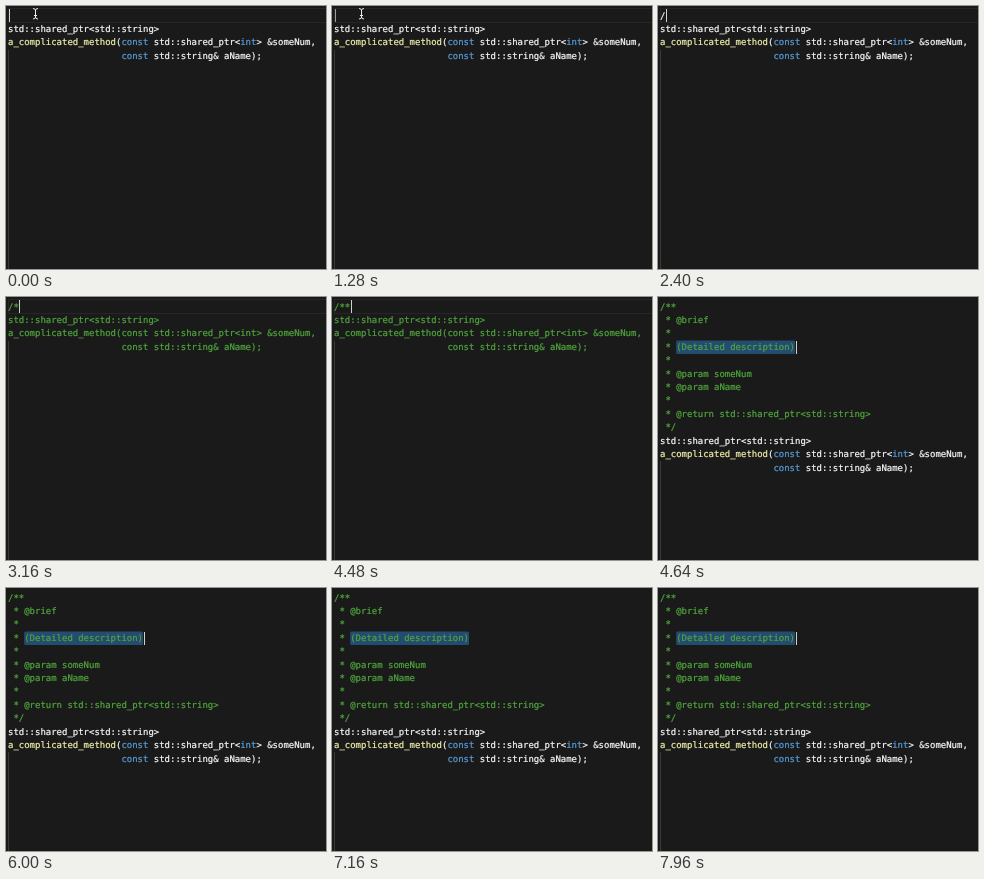
Animation of 320x263 px, one loop 8000 ms. Source, as an HTML page:

```html
<!DOCTYPE html>
<html lang="en">
<head>
<meta charset="utf-8">
<title>Comment block expansion</title>
<style>
  html, body { margin: 0; width: 100%; height: 100%; overflow: hidden; background: #1a1a1a; }
  svg { display: block; width: 100vw; height: 100vh; }
  text {
    font: 8.97px "DejaVu Sans Mono", "Liberation Mono", monospace;
    text-rendering: geometricPrecision;
    white-space: pre;
    color: #f8f8f8;
  }
  text, tspan { fill: currentColor; stroke: currentColor; stroke-width: 0.22px; }
  .key { color: #569cd6; }
  .name { color: #efefaa; }
  .note, .note tspan { color: #4fa53c; }
</style>
</head>
<body>
<svg viewBox="0 0 320 263">
  <rect width="320" height="263" fill="#1a1a1a"/>
  <rect id="active" x="2.5" y="2.5" width="320" height="14" fill="none" stroke="#262626"/>
  <rect id="guide" x="2" width="1" height="263" fill="#393939"/>
  <rect id="selection" height="13.4" rx="1.5" fill="#234c70"/>
  <g id="code"></g>
  <rect id="caret" width="1" height="13" fill="#d0d0d0"/>
  <path id="pointer" d="M27 2.5Q29.5 2.5 29.5 4.5Q29.5 2.5 32 2.5M29.5 4V11.5M27 13Q29.5 13 29.5 11Q29.5 13 32 13M28 9.5H31"
        fill="none" stroke="#eee" stroke-width="1"/>
</svg>
<script>
const LOOP = 8000, LEFT = 2, TOP = 3.3, ROW = 13.42, COL = 5.4, BASE = 9.2;
const $ = id => document.getElementById(id);

const signature = [
  'std::shared_ptr<std::string>',
  '[name:a_complicated_method]([key:const] std::shared_ptr<[key:int]> &someNum,',
  ' '.repeat(21) + '[key:const] std::string& aName);'
];
const block = [
  '/**', ' * @brief', ' *', ' * (Detailed description)', ' *',
  ' * @param someNum', ' * @param aName', ' *',
  ' * @return std::shared_ptr<std::string>', ' */'
];

// notes: number of leading lines shown as a comment
const steps = [
  { at: 0,    lines: [''],   notes: 0,  caret: [0, 0] },
  { at: 1640, lines: ['/'],  notes: 0,  caret: [1, 0] },
  { at: 3080, lines: ['/*'], notes: 4,  caret: [2, 0] },
  { at: 4280, lines: ['/**'], notes: 4, caret: [3, 0] },
  { at: 4600, lines: block,  notes: 10, caret: [25, 3], selected: 22 }
];

// Caret opacity: [time, value], linear between points
const blink = [
  [0, 1], [1160, 1], [1600, 0], [1639, 0], [1640, 1],
  [6080, 1], [6500, 0], [7520, 0], [7940, 1], [8000, 1]
];

function markup(line) {
  return line.replace(/&/g, '&amp;').replace(/</g, '&lt;').replace(/>/g, '&gt;')
    .replace(/\[(\w+):(\w+)\]/g, '<tspan class="$1">$2</tspan>');
}

function place(id, attrs) {
  for (const key in attrs) $(id).setAttribute(key, attrs[key]);
}

function showStep(step) {
  const lines = step.lines.concat(signature);
  $('code').innerHTML = lines.map((line, i) =>
    `<text xml:space="preserve" x="${LEFT}" y="${TOP + BASE + i * ROW}"` +
    `${i < step.notes ? ' class="note"' : ''}>${markup(line)}</text>`).join('');

  const [col, row] = step.caret;
  const width = (step.selected || 0) * COL;
  const x = LEFT + col * COL, y = TOP + row * ROW;
  place('caret', { x: Math.floor(x) + 1, y: Math.round(y) });
  place('selection', { x: x - width, y, width });
  place('guide', { y: Math.round(TOP + (lines.length - 1) * ROW) });
  $('active').style.display = step.selected ? 'none' : '';
  $('pointer').style.display = step.at ? 'none' : '';
}

function valueAt(points, t) {
  const i = points.findIndex(p => p[0] > t);
  const [t0, a] = points[i - 1], [t1, b] = points[i];
  return a + (b - a) * (t - t0) / (t1 - t0);
}

let shown;
const start = performance.now();
function draw() {
  const t = Math.max(0, performance.now() - start) % LOOP;
  const step = steps.filter(s => s.at <= t).pop();
  if (step !== shown) showStep(shown = step);
  $('caret').style.opacity = valueAt(blink, t);
  requestAnimationFrame(draw);
}
draw();
</script>
</body>
</html>
```
